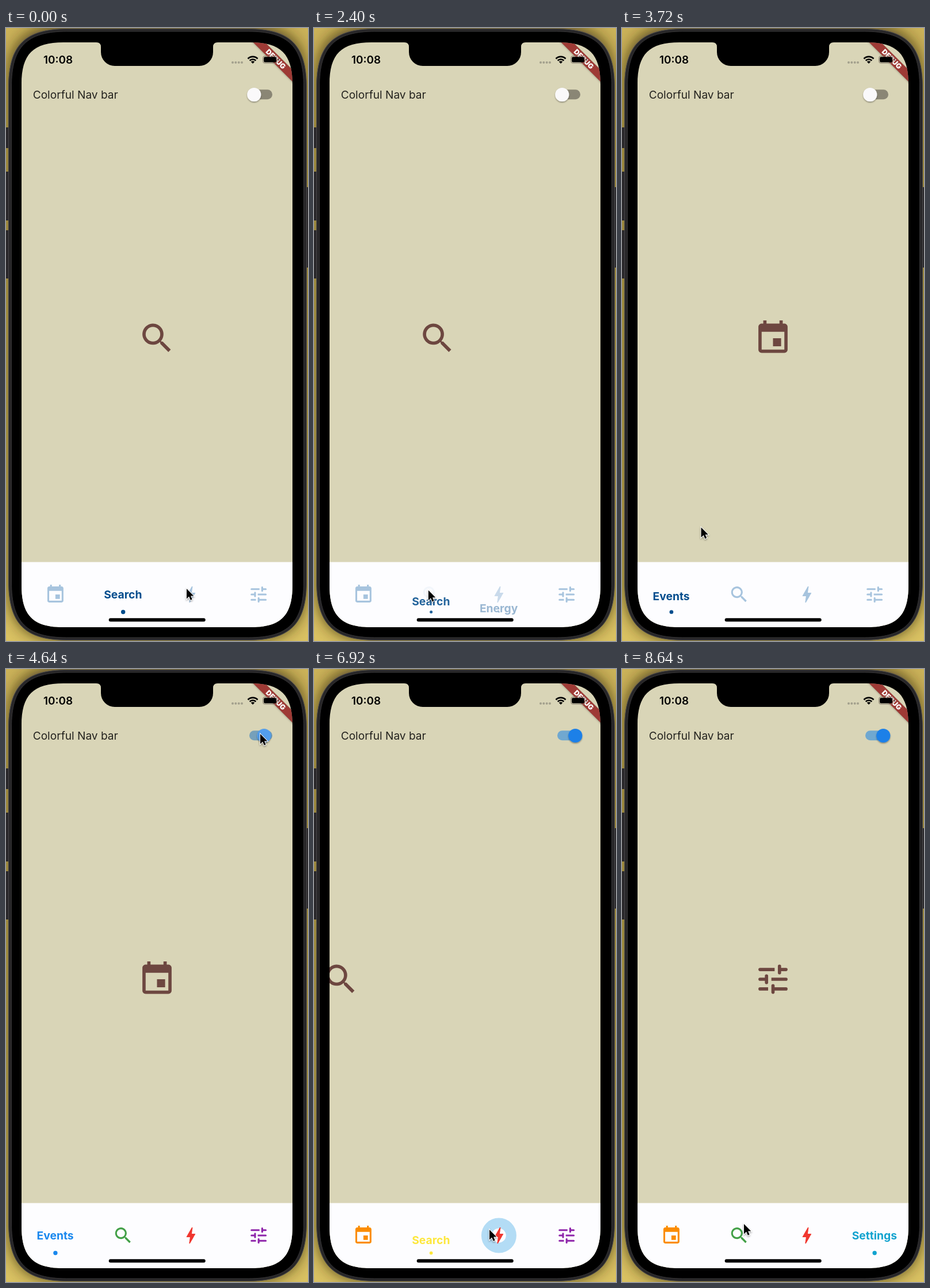
These frames come from a looping animation (525x1067 px, 8.68 s). An HTML page:

```html
<!DOCTYPE html>
<html lang="en">
<head>
<meta charset="utf-8">
<title>Colorful nav bar</title>
<style>
  html, body { margin: 0; width: 100%; height: 100%; overflow: hidden; background: #d3ba5c; }
  svg { display: block; width: 525px; height: 1067px; font-family: Inter, Roboto, sans-serif; }
</style>
</head>
<body>
<svg viewBox="0 0 525 1067">
  <defs>
    <filter id="soft" x="-20%" y="-20%" width="140%" height="140%"><feGaussianBlur stdDeviation="12"/></filter>
    <filter id="drop" x="-50%" y="-50%" width="200%" height="200%">
      <feDropShadow dx="0" dy="1.5" stdDeviation="1.3" flood-opacity=".4"/>
    </filter>
    <linearGradient id="wall" x2="0" y2="1">
      <stop stop-color="#cbb259"/><stop offset="1" stop-color="#d9c162"/>
    </linearGradient>
    <clipPath id="screen"><path id="glass"/></clipPath>
  </defs>

  <rect width="525" height="1067" fill="url(#wall)"/>
  <path id="shade" fill="#2a2108" opacity=".75" filter="url(#soft)"/>
  <g fill="#29272a">
    <rect x="-3" y="173" width="8" height="36" rx="1"/>
    <rect x="-3" y="250" width="8" height="85" rx="1"/>
    <rect x="-3" y="352" width="8" height="84" rx="1"/>
    <rect x="521" y="277" width="8" height="140" rx="1"/>
  </g>
  <path id="frame" fill="#272628" stroke="#4b4a4c"/>
  <path id="bezel" stroke="#353436"/>

  <g clip-path="url(#screen)">
    <rect x="27" y="25" width="471" height="1018" fill="#d9d5b7"/>
    <text x="46.7" y="122.5" font-size="19.1" fill="#22211d">Colorful Nav bar</text>
    <g id="page" fill="#6d4740"></g>
    <g id="switch"></g>
    <rect x="27" y="929.6" width="471" height="114" fill="#fdfdff"/>
    <g id="nav" font-size="19.3" font-weight="700" text-anchor="middle"></g>
    <g transform="translate(498 25) rotate(45)">
      <rect x="-60" y="33.8" width="120" height="14.5" opacity=".4" filter="url(#drop)"/>
      <rect x="-60" y="33.8" width="120" height="14.5" fill="#9e3a35"/>
      <text y="45.4" font-size="12.3" font-weight="900" text-anchor="middle" fill="#fff">DEBUG</text>
    </g>
  </g>

  <path d="M157 25q8 0 8 8v9a24 24 0 0 0 24 24h147a24 24 0 0 0 24-24v-9q0-8 8-8z"/>
  <text x="65" y="62" font-size="18.9" font-weight="600">10:08</text>
  <g fill="#a3a08d">
    <circle cx="394" cy="60" r="2"/><circle cx="399.3" cy="60" r="2"/>
    <circle cx="404.7" cy="60" r="2"/><circle cx="410" cy="60" r="2"/>
  </g>
  <path d="M429 62l-3.2-3.2a4.5 4.5 0 0 1 6.4 0z"/>
  <path d="M423.7 56.7a7.5 7.5 0 0 1 10.6 0M420.5 53.5a12 12 0 0 1 17 0" fill="none" stroke="#000" stroke-width="2.7"/>
  <rect x="446.5" y="48.7" width="25" height="12.6" rx="3.6" fill="none" stroke="#857a6d"/>
  <rect x="448" y="50.2" width="22" height="9.6" rx="2.4"/>
  <path d="M473 53v4.4q1.8-.7 1.8-2.2t-1.8-2.2" fill="#5a4a42"/>
  <rect x="178.7" y="1027.3" width="168" height="6" rx="3"/>
  <path id="cursor" d="M0 0V17l4-3.8 2.6 6 2.8-1.2-2.5-5.8H12z" stroke="#fff" stroke-width="1.8"
        paint-order="stroke" filter="url(#drop)"/>
</svg>
<script>
const LOOP = 8680, PAGE = 471, MOVE = 400, COLORS_AT = 4540;
const BLUE = '#034d8d', PALE = '#a7c4de', RIPPLE = '#b3dcf5';

const items = [
  { name: 'Events', on: '#1a88ee', off: '#fb8c00',
    icon: 'M17 12h-5v5h5v-5zM16 1v2H8V1H6v2H5c-1.11 0-2 .9-2 2v14c0 1.1.89 2 2 2h14c1.1 0 2-.9 2-2V5c0-1.1-.9-2-2-2h-1V1h-2zm3 18H5V8h14v11z' },
  { name: 'Search', on: '#fde73c', off: '#43a047',
    icon: 'M15.5 14h-.79l-.28-.27A6.5 6.5 0 1 0 13.73 14.43l.27.28v.79l5 4.99L20.49 19zM9.5 14a4.5 4.5 0 1 1 0-9 4.5 4.5 0 0 1 0 9z' },
  { name: 'Energy', on: '#43a047', off: '#f0372f',
    icon: 'M11 21h-1l1-7H7.5c-.58 0-.57-.32-.38-.66C8.48 10.94 10.42 7.54 13 3h1l-1 7h3.5c.49 0 .56.33.47.51C12.96 17.55 11 21 11 21z' },
  { name: 'Settings', on: '#12a3cf', off: '#8e24aa',
    icon: 'M9 17H4a1 1 0 0 0 0 2h5zM13 5H4a1 1 0 0 0 0 2h9zM13 20v-1h7a1 1 0 0 0 0-2h-7v-1a1 1 0 0 0-2 0v4a1 1 0 0 0 2 0zM7 10v1H4a1 1 0 0 0 0 2h3v1a1 1 0 0 0 2 0v-4a1 1 0 0 0-2 0zM11 11v2h9a1 1 0 0 0 0-2zM16 9a1 1 0 0 0 1-1V7h3a1 1 0 0 0 0-2h-3V4a1 1 0 0 0-2 0v4a1 1 0 0 0 1 1z' }
];

// [time, tab]
const taps = [[-2000, 1], [160, 2], [2080, 1], [3320, 0], [5840, 1], [6732, 2], [7640, 3]];
// [time, x, y]
const path = [
  [0, 314, 976], [300, 314, 976], [1150, 177, 794], [1350, 177, 794], [1950, 203, 979],
  [2300, 203, 979], [3150, 97, 970], [3550, 97, 970], [4350, 442, 113], [4800, 442, 113],
  [5600, 194, 975], [6000, 194, 975], [6550, 305, 976], [7000, 305, 976], [7500, 436, 978],
  [7850, 436, 978], [8600, 212, 966], [LOOP, 212, 966]
];

const $ = id => document.getElementById(id);
const clamp = v => Math.max(0, Math.min(1, v));
const smooth = v => v * v * (3 - 2 * v);
const mix = (a, b, k) => a + (b - a) * k;
const rgb = (a, b, k) => `rgb(${a.map((v, i) => Math.round(mix(v, b[i], k)))})`;
const icon = (d, x, y, size, attrs = '') =>
  `<path d="${d}" transform="translate(${x} ${y}) scale(${size}) translate(-12 -12)" ${attrs}/>`;

// Rounded box whose corners ease into the sides.
function box(id, x, y, w, h, r) {
  const a = 1.28 * r, b = a - .354 * r, c = a;
  $(id).setAttribute('d',
    `M${x + a} ${y}h${w - 2 * a}c${b} 0 ${c} ${a - b} ${c} ${a}v${h - 2 * a}c0 ${b} ${b - a} ${c} ${-a} ${c}` +
    `h${2 * a - w}c${-b} 0 ${-c} ${b - a} ${-c} ${-a}v${2 * a - h}c0 ${-b} ${a - b} ${-c} ${a} ${-c}z`);
}

function drawPage(from, to, age) {
  const pos = mix(from, to, smooth(clamp(age / MOVE)));
  $('page').innerHTML = items.map((it, i) => icon(it.icon, 262.5 + (i - pos) * PAGE, 540, 2.82)).join('');
}

function drawSwitch(t) {
  const k = 1 - (1 - clamp((t - COLORS_AT) / 200)) ** 2;
  $('switch').innerHTML =
    `<rect x="423" y="107.3" width="40" height="17" rx="8.5" fill="${rgb([138, 134, 117], [112, 168, 208], k)}"/>
     <circle cx="${mix(431.3, 454.3, k)}" cy="116" r="12.1" fill="${rgb([250, 249, 250], [28, 128, 232], k)}" filter="url(#drop)"/>`;
}

function drawNav(t, from, to, age) {
  const colorful = t >= COLORS_AT;
  $('nav').innerHTML = items.map((it, i) => {
    const x = 85.9 + i * PAGE / 4;
    let hidden = 1, ring = '';
    if (i === to) {
      hidden = 1 - clamp((age - 190) / 300);
      const outer = 30.5 * clamp(age / 150), hole = 30.5 * clamp((age - 120) / 170);
      if (outer > hole)
        ring = `<circle cx="${x}" cy="986" r="${(outer + hole) / 2}" fill="none" stroke="${RIPPLE}" stroke-width="${outer - hole}"/>`;
    } else if (i === from) hidden = clamp(age / MOVE);
    const shown = clamp(hidden * 2 - 1), on = colorful ? it.on : BLUE;
    return ring +
      icon(it.icon, x, 986, 1.55, `fill="${colorful ? it.off : PALE}" opacity="${shown}"`) +
      `<g fill="${on}" opacity="${1 - shown}">
         <text x="${x - .3}" y="${993 + 37 * hidden ** 2}">${it.name}</text>
         <circle cx="${x}" cy="1016.5" r="${3.7 * (1 - hidden ** 2)}"/>
       </g>`;
  }).join('');
}

function drawCursor(t) {
  const n = path.findIndex(p => p[0] > t), [t0, x0, y0] = path[n - 1], [t1, x1, y1] = path[n];
  const k = smooth((t - t0) / (t1 - t0));
  $('cursor').setAttribute('transform', `translate(${mix(x0, x1, k)} ${mix(y0, y1, k)}) scale(1.03)`);
}

function draw(now) {
  const t = now % LOOP;
  const n = taps.findLastIndex(p => p[0] <= t);
  const to = taps[n][1], from = n ? taps[n - 1][1] : to, age = t - taps[n][0];
  drawPage(from, to, age);
  drawSwitch(t);
  drawNav(t, from, to, age);
  drawCursor(t);
}

box('glass', 27, 25, 471, 1018, 57);
box('shade', 4, -4, 518, 1070, 80);
box('frame', 4.5, 1.5, 518, 1064, 80);
box('bezel', 9.5, 6, 508, 1055, 75);

const start = performance.now();
function tick() {
  draw(performance.now() - start);
  requestAnimationFrame(tick);
}
tick();
</script>
</body>
</html>
```
